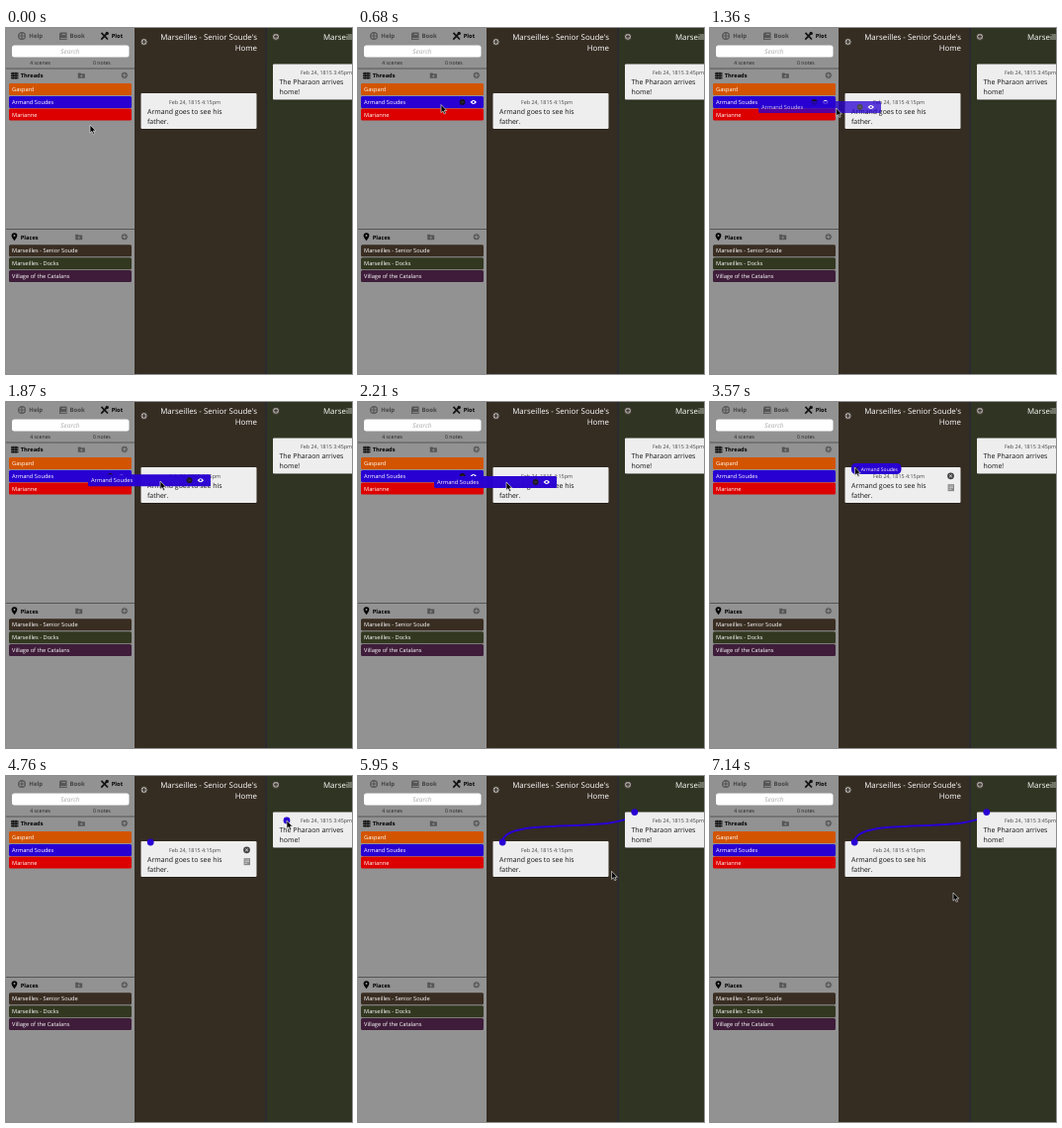
An HTML page for the animation above (7.44 s loop, 350x350 px).

```html
<!DOCTYPE html>
<html lang="en">
<head>
<meta charset="utf-8">
<title>Plot board</title>
<style>
  html, body { margin: 0; width: 100%; height: 100%; overflow: hidden; background: #352c22; }
  svg { display: block; width: 100vw; height: 100vh; }
  text { font: 5.7px "Open Sans", sans-serif; text-rendering: geometricPrecision; white-space: pre; }
  .bold { font-weight: 700; }
  .bar text, #tip text { fill: #fff; font-weight: 500; }
  .count { font-size: 5.2px; fill: #222; }
  .title { font-size: 7.9px; fill: #fff; }
  .date { font-size: 5.4px; fill: #444; }
  .body { font-size: 6.95px; fill: #111; }
</style>
</head>
<body>
<svg viewBox="0 0 350 350">
  <defs>
    <g id="add"><circle r="3.6"/><path d="M-2 0H2M0 -2V2" stroke-width="1"/></g>
    <g id="folder" fill="#555"><path d="M-3.5 -2.6h2.5l.8.8h3.7v4.6h-7z"/><path d="M-1.4 .6h2.8M0 -.8v2.8" stroke="#929292" stroke-width=".7"/></g>
    <g id="tools">
      <circle cx="102.6" cy="6" r="2.9" fill="#16121f"/>
      <path d="M101.5 6h2.2" stroke="#555" stroke-width=".8"/>
      <path d="M110.6 6q3.2 -4 6.4 0q-3.2 4 -6.4 0z" fill="#fff"/>
      <circle cx="113.8" cy="6" r="1.1" fill="#2800d2"/>
    </g>
    <g id="cardTools">
      <circle cx="243.5" cy="74.8" r="3.4" fill="#444"/>
      <path d="M242.2 73.5l2.6 2.6m0 -2.6l-2.6 2.6" stroke="#eee" stroke-width=".9"/>
      <rect x="240.6" y="83.2" width="6.4" height="7" fill="#888"/>
      <path d="M241.6 85h4.4m-4.4 1.7h4.4m-4.4 1.7h2.6" stroke="#ddd" stroke-width=".7"/>
    </g>
  </defs>

  <rect width="130" height="350" fill="#929292"/>
  <rect x="130" width="132" height="350" fill="#352c22"/>
  <rect x="262" width="2" height="350" fill="#2b2b2f"/>
  <rect x="264" width="86" height="350" fill="#2f3522"/>
  <path d="M0 41H130M0 203.5H130" stroke="#555"/>

  <g fill="none" stroke="#555" stroke-width="1.2">
    <circle cx="16" cy="8" r="3.4"/><path d="M16 5V11M13 8H19"/>
  </g>
  <path d="M55 4.5h6.5v7.4h-7.5v-6.4z" fill="#555"/>
  <path d="M56.5 6.5h3.5M55 10.6h6" stroke="#999" stroke-width=".8"/>
  <path d="M96.5 4.8L103 11.5M96.3 11.6L102.5 5.2" stroke="#111" stroke-width="1.7"/>
  <circle cx="102.2" cy="5.4" r="1.7" fill="#111"/>
  <g fill="#444">
    <text class="bold" x="23.3" y="10.3" style="font-size:6px">Help</text>
    <text class="bold" x="64.5" y="10.3" style="font-size:6px">Book</text>
    <text class="bold" x="106.8" y="10.3" fill="#000">Plot</text>
  </g>
  <rect x="6" y="17.5" width="118.5" height="12" rx="2.5" fill="#fff"/>
  <text x="65" y="25.8" text-anchor="middle" fill="#aaa" style="font-size:6.5px;font-style:italic">Search</text>
  <text class="count" x="24.3" y="37">4 scenes</text>
  <text class="count" x="88" y="37">0 notes</text>

  <path d="M5 46h7.5M5 48.3h7.5M5 50.6h7.5" stroke="#111" stroke-width="1.5"/>
  <path d="M7.2 44.5v7.5M10 44.5v7.5" stroke="#111" stroke-width=".8"/>
  <text class="bold" x="14.8" y="50.2">Threads</text>
  <path d="M8.5 215.2Q5.6 211.8 5.6 210.1a2.9 2.9 0 0 1 5.8 0Q11.4 211.8 8.5 215.2z" fill="#000"/>
  <circle cx="8.5" cy="210" r="1" fill="#929292"/>
  <text class="bold" x="14.8" y="213.6">Places</text>
  <use href="#folder" x="76.3" y="48"/>
  <use href="#folder" x="73.7" y="211.4"/>
  <g fill="#555" stroke="#929292">
    <use href="#add" x="119.8" y="47.8"/><use href="#add" x="119.8" y="211.3"/>
  </g>
  <g fill="#a5a39f" stroke="#352c22">
    <use href="#add" x="139.6" y="14"/><use href="#add" x="273" y="8.8"/>
  </g>
  <g id="bars"></g>
  <use id="hoverTools" href="#tools" x="3" y="69"/>

  <text class="title" x="254" y="12" text-anchor="end">Marseilles - Senior Soude's</text>
  <text class="title" x="254" y="22.6" text-anchor="end">Home</text>
  <text class="title" x="321" y="12">Marseilles - Docks</text>

  <path id="link" d="M146 67C146 39 270 61 280 36" fill="none" stroke="#2800d2" stroke-width="2"/>
  <g id="cards"></g>
  <use id="icons" href="#cardTools"/>

  <circle id="startDot" cx="146.2" cy="67" r="3.4" fill="#2800d2"/>
  <circle id="endDot" r="3.4" fill="#2800d2"/>
  <g id="tip">
    <rect x="143" y="62" width="50.5" height="11" rx="4.5" fill="#2800d2"/>
    <path d="M146.5 65.5l3.6 3.6m0 -3.6l-3.6 3.6" stroke="#111"/>
    <text x="152.8" y="69.5" style="font-size:5px">Armand Soudes</text>
  </g>
  <g id="ghost"></g>
  <path id="cursor" d="M0 0V8.2L1.9 6.5L3.2 9.4L4.6 8.8L3.3 6H5.8Z" fill="#000" stroke="#ddd" stroke-width=".7"/>
</svg>
<script>
const $ = id => document.getElementById(id);
const STEP = 170, LOOP = 7440, LAST = 42;

const bar = (label, color, x, y) => `<g class="bar" transform="translate(${x} ${y})">
  <rect width="124" height="12" rx="1.5" fill="${color}"/><text x="3" y="8.2">${label}</text></g>`;
const card = (x, y, dateX, date, lines) => `<g transform="translate(${x} ${y})">
  <rect y=".8" width="117" height="36" rx="1" fill="#0005"/>
  <rect width="117" height="36" rx="1" fill="#eee"/>
  <text class="date" x="${dateX}" y="10.6">${date}</text>
  ${lines.map((s, i) => `<text class="body" x="6.5" y="${21 + i * 9.9}">${s}</text>`).join("")}</g>`;

$("bars").innerHTML = [
  ["Gaspard", "#d35400", 56], ["Armand Soudes", "#2800d2", 69], ["Marianne", "#dc0000", 81.6],
  ["Marseilles - Senior Soude", "#392d22", 219.3], ["Marseilles - Docks", "#323820", 232.2],
  ["Village of the Catalans", "#3f1d3a", 245]
].map(([label, color, y]) => bar(label, color, 3, y)).join("");
$("cards").innerHTML =
  card(136.5, 66, 28.4, "Feb 24, 1815 4:15pm", ["Armand goes to see his", "father."]) +
  card(270, 36.4, 28, "Feb 24, 1815 3:45pm", ["The Pharaon arrives", "home!"]);
$("ghost").innerHTML = bar("Armand Soudes", "#2800d2", 0, 0) + '<use href="#tools"/>';

// Keys: [step, x, y]
const cursorPath = [[0, 85, 98], [3, 82, 77], [5, 86, 78], [8, 127.6, 81], [11, 156, 80], [13, 150, 81],
  [16, 141, 76.5], [19, 146.5, 66], [22, 146.5, 66], [28, 284, 45], [30, 283, 42], [37, 246, 118], [42, 246, 118]];
const ghostPath = [[4, 3, 69], [8, 49, 74], [11, 83, 73.2], [13, 77, 75]];

function at(path, step) {
  const i = Math.max(1, path.findIndex(k => k[0] >= step));
  const [s0, x0, y0] = path[i - 1], [s1, x1, y1] = path[i];
  const p = (step - s0) / (s1 - s0);
  return [x0 + (x1 - x0) * p, y0 + (y1 - y0) * p];
}
const move = (id, [x, y]) => $(id).setAttribute("transform", `translate(${x} ${y})`);
const show = (id, on) => $(id).style.display = on ? "" : "none";

function draw(step) {
  const pointer = at(cursorPath, step);
  const dragging = step >= 5 && step <= 13, linked = step >= 30;
  const hoverDot = step >= 18 && step <= 22;
  move("cursor", pointer);
  if (dragging) {
    move("ghost", at(ghostPath, step));
    $("ghost").setAttribute("opacity", Math.min(.97, .75 + .073 * Math.max(0, step - 8)));
  }
  move("endDot", linked ? [279.8, 36.6] : pointer);
  show("ghost", dragging);
  show("hoverTools", step >= 2 && step <= 13);
  show("icons", step >= 14 && !linked);
  show("startDot", step >= 14 && !hoverDot);
  show("tip", hoverDot);
  show("endDot", step >= 23);
  show("link", linked);
}

function tick() {
  draw(Math.min(LAST, Math.floor(performance.now() % LOOP / STEP)));
  requestAnimationFrame(tick);
}
tick();
</script>
</body>
</html>
```
